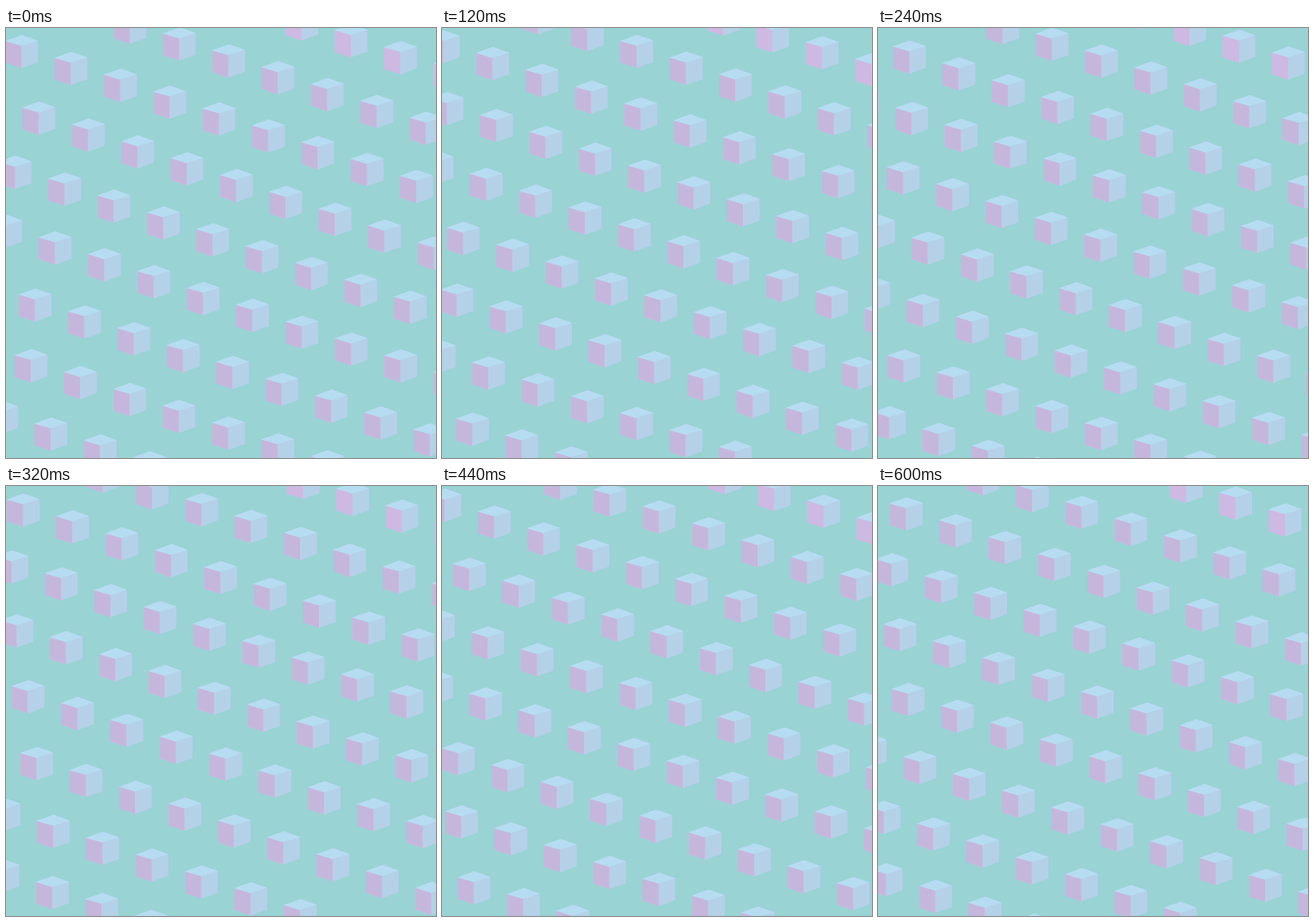
Animation of 500 by 500 pixels, one loop 640 ms. Source, as an HTML page with a canvas:

```html
<!DOCTYPE html>
<html lang="en">
<head>
<meta charset="utf-8">
<title>Sliding cubes</title>
<style>
html, body { margin: 0; width: 100%; height: 100%; overflow: hidden; background: #99d3d4; }
canvas { display: block; width: 500px; height: 500px; }
</style>
</head>
<body>
<canvas id="stage" width="500" height="500"></canvas>
<script>
const ctx = document.getElementById('stage').getContext('2d');
const GAP = 57.4, SLOPE = 0.3415;
const FRAME = 40, LOOP = 640;

// Each row: starting x, height of its line at x = 0
const rows = [
  [56.7, -122], [29.1, -50], [18, 21.4], [38.1, 92], [10.6, 164.4],
  [-0.5, 236.4], [33.7, 310.8], [28.9, 383], [52, 454.6]
];

function face(color, points) {
  ctx.fillStyle = color;
  ctx.beginPath();
  for (const [x, y] of points) ctx.lineTo(x, y);
  ctx.fill();
}

function cube(x, y, leftColor) {
  const apex = [0.6, -19.4], right = [19.2, -12.8], front = [-0.2, -6.8], left = [-19.2, -12.4];
  const lowRight = [19.2, 12.4], lowLeft = [-19.2, 12.9], bottom = [-0.2, 19.3];
  ctx.save();
  ctx.translate(x, y);
  // Full outline first, so no seam shows between the faces
  face('#b4d1e8', [apex, right, lowRight, bottom, lowLeft, left]);
  face(leftColor, [left, front, bottom, lowLeft]);
  face('#b6dcf2', [apex, right, front, left]);
  ctx.restore();
}

function draw(now) {
  const frame = Math.floor(now % LOOP / FRAME);
  const step = Math.floor(frame * 1.25); // every fifth step is skipped
  ctx.fillStyle = '#99d3d4';
  ctx.fillRect(0, 0, 500, 500);
  rows.forEach(([start, base], i) => {
    const shift = step * (i % 2 ? 8.34 : -5.56);
    const first = ((start + shift) % GAP + GAP) % GAP - GAP;
    for (let x = first; x < 520; x += GAP) {
      cube(x, base + x * SLOPE, i ? '#c5b7dc' : '#cdb9e1');
    }
  });
}

const begin = performance.now();
function tick() {
  draw(performance.now() - begin);
  requestAnimationFrame(tick);
}
tick();
</script>
</body>
</html>
```
